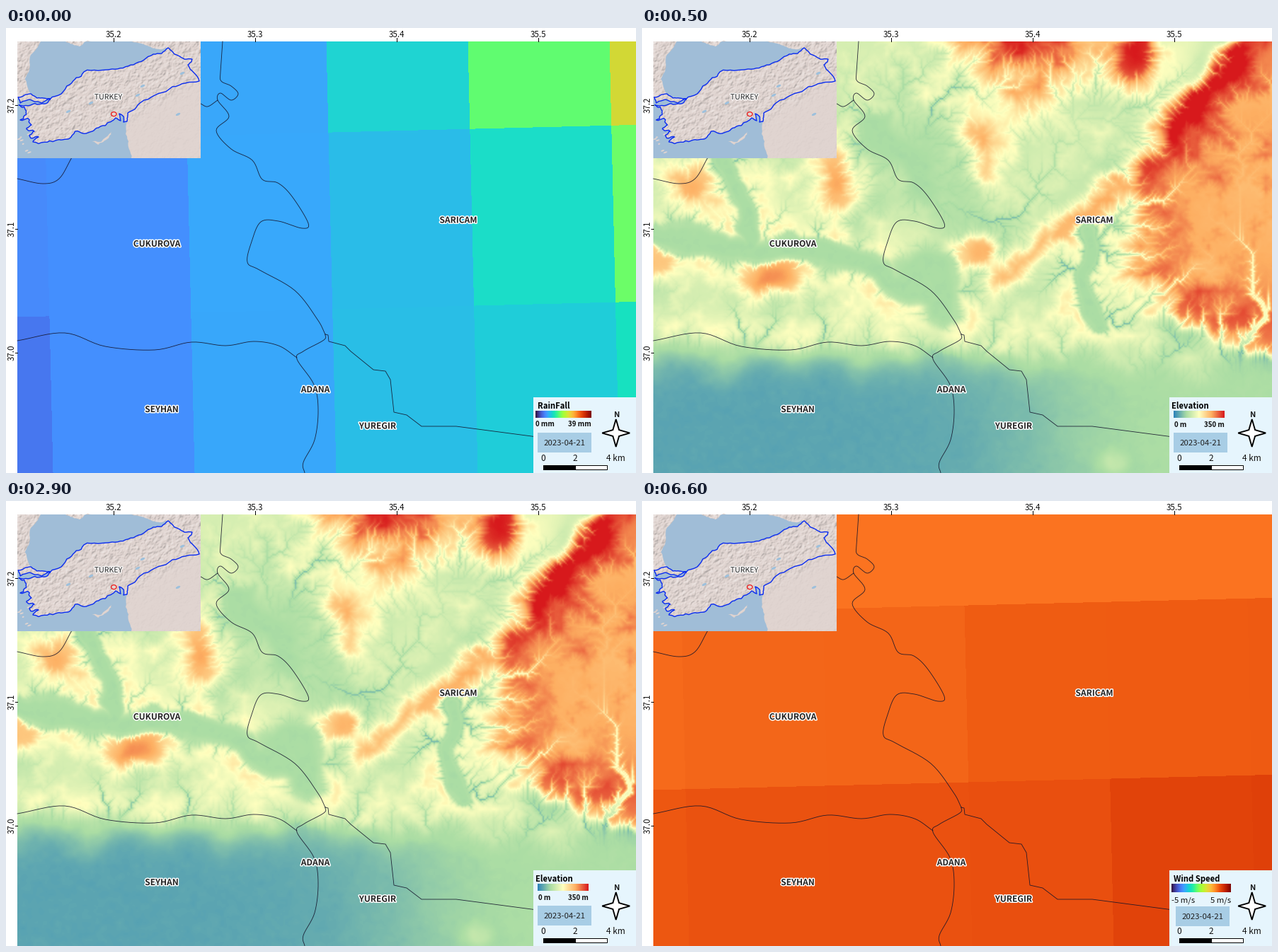
Write a matplotlib script that moves like this. It is 890x629 px and loops after 8000 ms.

```python
import numpy as np
import matplotlib.pyplot as plt
from matplotlib.animation import FuncAnimation
from matplotlib.colors import LinearSegmentedColormap
from matplotlib.patches import Ellipse, Polygon, Rectangle
from matplotlib.patheffects import withStroke

WIDTH, HEIGHT = 890, 629
LEFT, TOP = 16, 19
PT = 0.72  # points per pixel at 100 dpi
STEP_MS, STEPS = 500, 16
SPECTRAL = LinearSegmentedColormap.from_list(
    "elevation", ["#2b83ba", "#abdda4", "#ffffbf", "#fdae61", "#d7191c"])

plt.rcParams["font.family"] = ["Noto Sans CJK JP", "DejaVu Sans"]
rng = np.random.default_rng(12)

fig = plt.figure(figsize=(8.9, 6.29), dpi=100, facecolor="white")
ax = fig.add_axes([0, 0, 1, 1])
ax.set_xlim(0, WIDTH)
ax.set_ylim(HEIGHT, 0)
ax.set_autoscale_on(False)
ax.axis("off")


# ---------- drawing helpers ----------

def text(x, y, s, px, bold=False, ha="center", color="#111111", halo=0, z=9, **kw):
    t = ax.text(x, y, s, fontsize=px * PT, weight="bold" if bold else "normal",
                ha=ha, va="baseline", color=color, zorder=z, **kw)
    if halo:
        t.set_path_effects([withStroke(linewidth=halo * PT, foreground="white")])
    return t


def rect(x0, y0, x1, y1, face, edge="none", lw=0, z=7):
    return ax.add_patch(Rectangle((x0, y0), x1 - x0, y1 - y0, facecolor=face,
                                  edgecolor=edge, linewidth=lw * PT, zorder=z))


def poly(pts, face, edge="none", lw=0, z=5, **kw):
    return ax.add_patch(Polygon(pts, closed=True, facecolor=face, edgecolor=edge,
                                linewidth=lw * PT, zorder=z, **kw))


def oval(x, y, w, h, z, **kw):
    return ax.add_patch(Ellipse((x, y), w, h, zorder=z, **kw))


def image(data, x0, y0, x1, y1, z, **kw):
    return ax.imshow(data, extent=(x0, x1, y1, y0), aspect="auto", zorder=z, **kw)


def smooth(pts, n=8):
    """Catmull-Rom curve through the points."""
    p = np.array(pts, float)
    p = np.vstack([2 * p[0] - p[1], p, 2 * p[-1] - p[-2]])
    t = np.linspace(0, 1, n, endpoint=False)[:, None]
    out = []
    for a, b, c, d in zip(p, p[1:], p[2:], p[3:]):
        out.append(0.5 * (2 * b + (c - a) * t + (2 * a - 5 * b + 4 * c - d) * t**2
                          + (3 * b - a - 3 * c + d) * t**3))
    return np.vstack(out + [p[-2:-1]])


def coastline(pts, amp=0.08, depth=3):
    """Midpoint displacement: every side gains a random bend."""
    p = np.array(pts, float)
    for _ in range(depth):
        side = np.diff(p, axis=0)
        normal = side[:, ::-1] * [-1, 1]
        mid = p[:-1] + side / 2 + normal * rng.normal(0, amp, (len(side), 1))
        both = np.empty((2 * len(p) - 1, 2))
        both[::2], both[1::2] = p, mid
        p = both
    return p


def blur(a, s):
    r = int(3 * s) + 1
    g = np.exp(-0.5 * (np.arange(-r, r + 1) / s) ** 2)
    g /= g.sum()
    for axis in (0, 1):
        pad = [(r, r) if i == axis else (0, 0) for i in (0, 1)]
        a = np.apply_along_axis(np.convolve, axis, np.pad(a, pad, "edge"), g, "valid")
    return a


def sigmoid(v):
    return 1 / (1 + np.exp(-np.clip(v, -50, 50)))


# ---------- terrain ----------

W, H = 437, 305
gx = LEFT + 2 * (np.arange(W) + 0.5)
gy = TOP + 2 * (np.arange(H) + 0.5)
N8 = [(j, i) for j in (-1, 0, 1) for i in (-1, 0, 1) if i or j]
REACH = np.array([np.hypot(*n) for n in N8])


def noise(*sizes):
    out = np.zeros((H, W))
    for s in sizes:
        v = rng.normal(size=(H // s + 2, W // s + 2))
        rows = np.array([np.interp(np.arange(W) / s, np.arange(v.shape[1]), r) for r in v])
        out += s / sizes[0] * np.array(
            [np.interp(np.arange(H) / s, np.arange(v.shape[0]), c) for c in rows.T]).T
    return out


# Map coordinates, bent a little so that no shape is geometric
X, Y = np.meshgrid(gx, gy)
X = X + 9 * blur(noise(24, 12, 6), 2)
Y = Y + 9 * blur(noise(24, 12, 6), 2)


def bump(x, y, r, amp):
    return amp * np.exp(-((X - x) ** 2 + (Y - y) ** 2) / r**2)


def dist(pts):
    d = np.full((H, W), np.inf)
    for (x0, y0), (x1, y1) in zip(pts, pts[1:]):
        dx, dy = x1 - x0, y1 - y0
        t = np.clip(((X - x0) * dx + (Y - y0) * dy) / (dx * dx + dy * dy), 0, 1)
        d = np.minimum(d, np.hypot(X - x0 - t * dx, Y - y0 - t * dy))
    return d


def around(a):
    p = np.pad(a, 1, constant_values=np.inf)
    return np.stack([p[1 + j:1 + j + H, 1 + i:1 + i + W] for j, i in N8])


def fill_pits(h, outlet, passes=320):
    w = np.where(outlet, h, np.inf)
    for _ in range(passes):
        w = np.where(outlet, h, np.maximum(h, around(w).min(0) + 1e-3))
    return np.where(np.isinf(w), h, w)


def erode(h, outlet, land, k=0.05, lift=0.5, rounds=16):
    """Stream-power erosion, solved from the outlets upwards."""
    idx = np.arange(H * W).reshape(H, W)
    offset = np.array([j * W + i for j, i in N8])
    for _ in range(rounds):
        h = h + lift * land
        drop = (h - around(h)) / REACH[:, None, None]
        best = drop.argmax(0)
        flat = (drop.max(0) <= 0) | outlet
        to = np.where(flat, idx, idx + offset[best]).ravel().tolist()
        order = np.argsort(h, axis=None).tolist()
        area = [1.0] * (H * W)
        for i in reversed(order):
            if to[i] != i:
                area[to[i]] += area[i]
        f = (k * np.sqrt(np.array(area)) / REACH[best].ravel()).tolist()
        z = h.ravel().tolist()
        for i in order:
            if to[i] != i:
                z[i] = (z[i] + f[i] * z[to[i]]) / (1 + f[i])
        h = np.array(z).reshape(H, W)
    return h


def terrain():
    """Elevation in percent of the colour scale."""
    # western hills and basins: x, y, radius, height
    h = np.full((H, W), 38.0)
    for hill in [(70, 220, 38, 17), (268, 215, 40, 20), (175, 348, 30, 24),
                 (30, 325, 26, 12), (468, 322, 24, 20), (540, 10, 95, 48),
                 (700, 20, 60, 40), (480, 168, 42, 17), (365, 160, 75, -9),
                 (430, 260, 80, -8)]:
        h += bump(*hill)
    h += 14 * np.exp(-(dist([(515, 342), (610, 275), (705, 210)]) / 24) ** 2)

    # eastern plateau behind a scarp
    edge = np.interp(Y, [19, 90, 200, 270, 345, 410, 475, 560],
                     [838, 765, 715, 690, 690, 770, 890, 1050])
    s = X - edge
    top = 73 + 25 * np.exp(-np.maximum(s, 0) / 75) * sigmoid((210 - Y) / 25)
    foot = 12 * np.exp(-np.maximum(-s, 0) / 35) * sigmoid((300 - Y) / 15)
    h += foot + (top - h - foot) * sigmoid(s / 13)

    # southern plain
    plain = 9.5 + 17 * sigmoid((X - 570) / 65)
    h = plain + (h - plain) * sigmoid((466 - Y) / 15)

    # reservoir arms: width and course
    lake = np.zeros((H, W))
    for w, course in [(16, [(0, 292), (150, 308), (320, 340), (430, 400)]),
                      (26, [(375, 352), (415, 350), (425, 395)]),
                      (15, [(325, 135), (385, 195), (400, 245)]),
                      (10, [(148, 305), (140, 250), (118, 195)]),
                      (9, [(638, 290), (632, 345), (645, 410)])]:
        lake = np.maximum(lake, 1 / (1 + (dist(course) / w) ** 6))
    h += (25 - h) * lake

    outlet = (lake > 0.7) | (h < 23)
    outlet[-1, :] = outlet[:, 0] = True
    land = np.clip((h - 25) / 12, 0, 1) * (1 - lake)
    start = h + noise(16, 8, 4, 2) * 2.5 * (0.15 + land)
    worn = erode(fill_pits(start, outlet), outlet, land)
    detail = worn - blur(worn, 14)
    detail /= detail[land > 0.5].std()
    h += 8.5 * land * np.clip(detail, -2.8, 2.2)
    h += bump(436, 456, 24, -8) + bump(665, 614, 15, 9) + 0.35 * noise(4, 2)
    return np.clip(h, 5, 100)


# ---------- gridded weather layers ----------

def corner(k, j):
    y = 159 + 250 * j
    for _ in range(4):
        x = 53 + 200 * k + 0.023 * (y - TOP)
        y = 159 + 250 * j - 0.0247 * (x - LEFT)
    return x, y


def cells(rows):
    frame = Rectangle((LEFT, TOP), WIDTH - LEFT, HEIGHT - TOP, transform=ax.transData)
    out = []
    for j, row in enumerate(rows, -1):
        for k, color in enumerate(row.split(), -1):
            quad = [corner(k, j), corner(k + 1, j), corner(k + 1, j + 1), corner(k, j + 1)]
            p = poly(quad, "#" + color, z=1, antialiased=False)
            p.set_clip_path(frame)
            out.append(p)
    return out


rain = cells(["4789fb 448ffe 39a7fa 1fd4d2 60fc70 d2d835",
              "478afb 448ffe 38a8fb 2abce8 1bddc8 6cfd68",
              "4777ef 448ffe 38a7fa 29bee6 1fcdd9 17e1c0"])
wind = cells(["fb7320 " * 6,
              "f66a1b f36619 f36518 ef5c12 ef5b12 ee5a12",
              "ed5711 ea5210 ea5110 e94f0f e1430a df4009"])
elevation = [image(terrain(), LEFT, TOP, WIDTH, HEIGHT, 1, cmap=SPECTRAL,
                   vmin=0, vmax=100, interpolation="bilinear")]

# ---------- district borders ----------

river = [(306, 19), (303, 62), (304, 75), (318, 82), (328, 93), (318, 102), (303, 92),
         (299, 102), (315, 125), (297, 145), (318, 171), (348, 187), (362, 214),
         (384, 219), (404, 238), (427, 276), (418, 283), (385, 273), (360, 274),
         (347, 302), (341, 331), (358, 342), (408, 371), (440, 412), (451, 433)]
south = [(451, 433), (449, 441), (420, 457), (411, 468), (435, 504), (441, 540),
         (436, 582), (420, 614), (422, 629)]
west = [(16, 442), (83, 431), (140, 450), (210, 455), (262, 444), (310, 449),
        (350, 443), (385, 449), (411, 466)]
east = [(451, 433), (455, 434), (456, 443), (479, 449), (487, 457), (519, 483),
        (536, 485), (543, 497), (548, 543), (566, 547), (587, 563), (636, 563), (750, 578)]
spur = [(275, 107), (285, 111), (299, 102)]
nook = [(16, 213), (52, 220), (75, 213), (93, 183)]
for line in [smooth(p) for p in (river, south, west, spur, nook)] + [np.array(east)]:
    ax.plot(*line.T, color="#14142a", lw=0.85 * PT, alpha=0.9, zorder=3)

for name, x, y in [("CUKUROVA", 213, 309), ("SARICAM", 639, 275.5), ("SEYHAN", 220, 543),
                   ("ADANA", 437, 515), ("YUREGIR", 525, 566.5)]:
    text(x, y, name, 12, bold=True, color="#222222", halo=3, z=4)

# ---------- overview inset ----------

SEA, LAND = "#a0bdd7", "#e0d4d0"
INSET = (16, 19, 275, 184)
rect(*INSET, SEA, z=5)
north = coastline([(62, 101), (90, 80), (110, 62), (150, 58), (180, 52), (208, 37), (229, 28)])
border = coastline([(229, 28), (243, 39), (263, 44), (257, 52), (273, 75), (235, 83),
                    (195, 102), (172, 120), (171, 132)])
coast = coastline([(171, 132), (166, 133), (166, 125), (160, 121), (162, 131), (155, 127),
                   (140, 138), (122, 146), (98, 146), (90, 156), (70, 159)])
aegean = coastline([(70, 159), (38, 161), (46, 154), (33, 152), (40, 146), (29, 143),
                    (36, 137), (20, 130), (27, 115), (18, 109), (44, 108), (62, 101)], 0.16)
thrace = coastline([(62, 100), (44, 99), (35, 93), (17, 98), (20, 106), (38, 103),
                    (62, 100)], 0.1)
caucasus = coastline([(229, 28), (216, 30), (200, 25), (174, 19)])
levant = coastline([(177, 184), (173, 160), (171, 132)])
balkans = coastline([(49, 19), (35, 38), (30, 65), (35, 93)])
mainland = np.vstack([north, caucasus, [(275, 19), (275, 184)], levant, coast, aegean])
cyprus = coastline([(122, 160), (149, 147), (142, 158), (130, 165), (122, 160)])
crimea = coastline([(84, 19), (104, 26), (124, 19)])
lands = [poly(p, LAND, z=5.1) for p in
         (mainland, np.vstack([balkans, [(16, 100), (16, 19)]]), thrace, cyprus, crimea)]
for x, y in rng.uniform((18, 140), (34, 182), (7, 2)):
    oval(x, y, rng.uniform(2, 6), 2, 5.1, angle=-20, facecolor=LAND)

# Hillshade, fading out over the flat south-east
ix, iy = np.meshgrid(np.arange(16, 275), np.arange(19, 184))
grain = rng.normal(size=ix.shape)
shade = sum(np.gradient(blur(grain, 0.9) + 3 * blur(grain[::-1], 2.2)))
shade *= (0.12 + 0.88 * sigmoid((222 - 0.55 * ix - iy) / 6)) / shade.std()
rgba = np.zeros(ix.shape + (4,))
rgba[..., :3] = np.where(shade > 0, 1.0, 0.42)[..., None]
rgba[..., 3] = np.clip(np.abs(shade) * 0.13, 0, 0.4)
for p in lands:
    image(rgba, *INSET, 5.2, interpolation="bilinear").set_clip_path(p)

for x, y in [(120, 106), (249, 64), (88, 118), (193, 82), (186, 95), (243, 122)]:
    oval(x, y, 7, 3.2, 5.3, angle=-25, facecolor="#9dc0dc")
for line in (np.vstack([north, border, coast, aegean]), thrace):
    ax.plot(*line.T, color="#0a2cf0", lw=1.4 * PT, zorder=5.4)
oval(152.3, 121.7, 7.5, 6, 5.5, fill=False, edgecolor="#ee1c1c", linewidth=1.3 * PT)
text(144.5, 101, "TURKEY", 10.6, color="#222222", halo=2.5, z=5.6)

# ---------- coordinate frame ----------

for i in range(4):
    x = 152 + 200 * i
    text(x, 13, f"35.{i + 2}", 11.6)
    ax.plot([x, x], [14, 19], color="black", lw=PT, zorder=6)
for i in range(3):
    y = 109 + 175 * i
    text(11.5, y, f"{37.2 - i / 10:.1f}", 11.6, rotation=90, rotation_mode="anchor")
    ax.plot([12.5, 16], [y, y], color="black", lw=PT, zorder=6)

# ---------- legend ----------

rect(745, 522, 890, 629, "#e6f5fd")
text(863, 550, "N", 11, bold=True)
star = [(861.7 + r * np.sin(a), 572.5 - r * np.cos(a))
        for a, r in zip(np.arange(8) * np.pi / 4, [19.5, 6.2] * 4)]
poly(star, "white", "black", 1.9, z=8)
for x, label in [(759, "0"), (804, "2"), (861, "4 km")]:
    text(x, 612, label, 12)
rect(759, 617.5, 849, 623.5, "white", "black", 1, z=8)
rect(759, 617.5, 804, 623.5, "black", "black", 1, z=8.1)


def legend(title, tx, bar, cmap, ends, ends_y, end_px, bold, date):
    x0, y0, x1, y1 = bar
    dx, dy = date
    ramp = np.linspace(0, 1, 256)[None]
    return [text(tx, 538, title, 11.3, bold=True, ha="left", color="black"),
            image(ramp, x0, y0, x1, y1, 8, cmap=cmap),
            text(x0 + 0.5, ends_y, ends[0], end_px, bold, ha="left"),
            text(x1, ends_y, ends[1], end_px, bold, ha="right"),
            rect(dx, dy, dx + 75.5, dy + 28, "#a8cde5", z=8),
            text(dx + 37.5, dy + 18, "2023-04-21", 11.4, color="#222222")]


rain += legend("RainFall", 751, (748, 541.5, 827, 551), "turbo",
               ("0 mm", "39 mm"), 563, 9.8, True, (751, 572))
elevation += legend("Elevation", 748, (751, 542, 823, 551.5), SPECTRAL,
                    ("0 m", "350 m"), 564, 9.8, True, (751, 571.5))
wind += legend("Wind Speed", 751, (748, 541.5, 832, 553.5), "turbo",
               ("-5 m/s", "5 m/s"), 567.5, 11.4, False, (754, 573))

# ---------- slideshow ----------

scenes = [(0, rain), (500, elevation), (4500, wind)]


def update(i):
    now = max(n for n, (start, _) in enumerate(scenes) if i * STEP_MS >= start)
    for n, (_, artists) in enumerate(scenes):
        for a in artists:
            a.set_visible(n == now)
    return []


anim = FuncAnimation(fig, update, frames=STEPS, interval=STEP_MS,
                     init_func=lambda: update(0), repeat=True, repeat_delay=0, blit=False)
plt.show()
```
